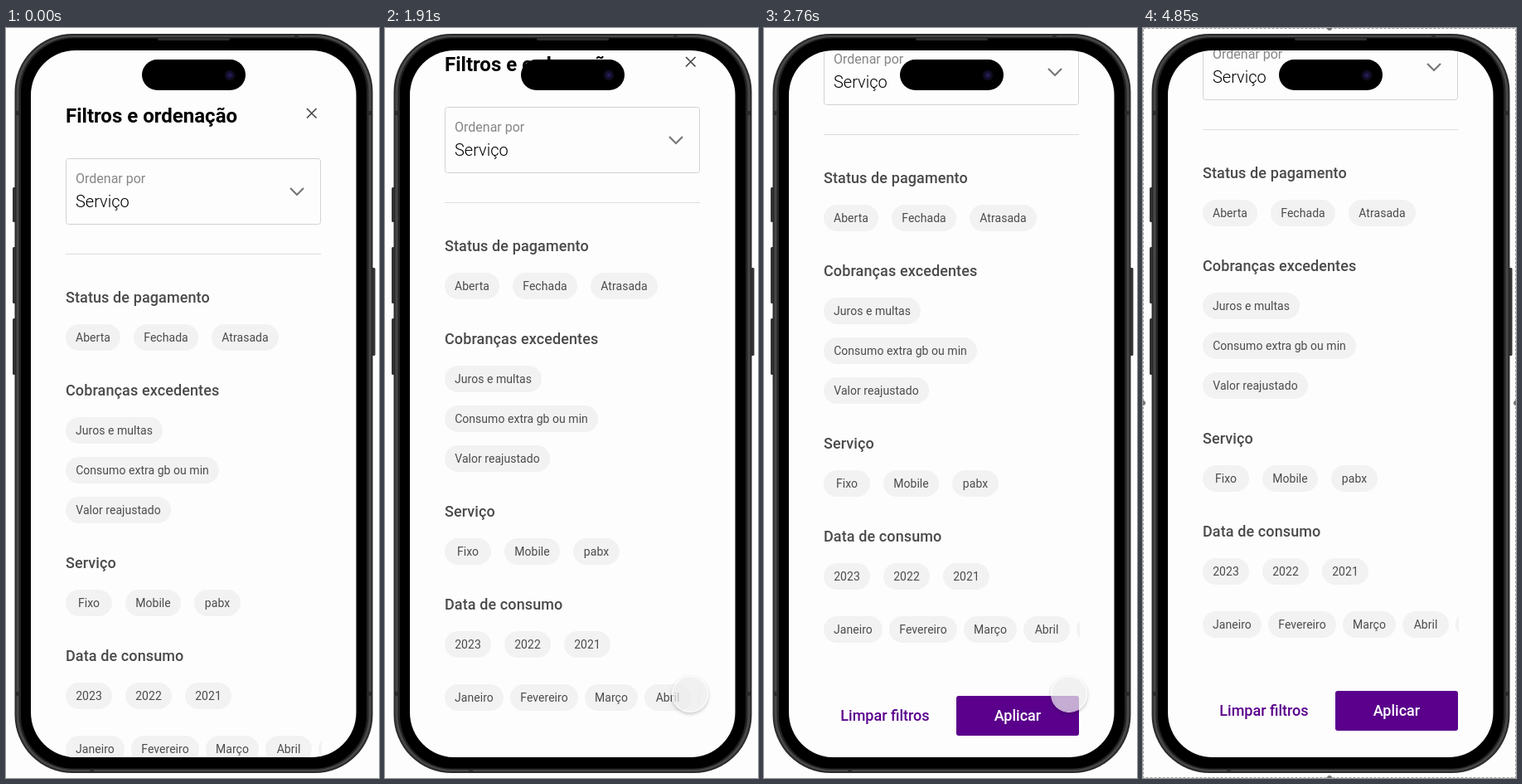
Write an HTML page that moves like this. It is 450x904 px and loops after 4880 ms.

```html
<!DOCTYPE html>
<html lang="pt-BR">
<head>
<meta charset="utf-8">
<title>Filtros e ordenação</title>
<style>
html, body { margin: 0; width: 100%; height: 100%; overflow: hidden; background: #fdfdfd; }
svg { position: absolute; left: 0; top: 0; font-family: Roboto, sans-serif; }
.title { font-size: 24px; font-weight: 700; }
.label { font-size: 16px; fill: #868686; }
.value { font-size: 20px; font-weight: 300; }
.head { font-size: 18px; font-weight: 500; fill: #4a4a4a; letter-spacing: .1px; }
.chip { font-size: 14px; fill: #4c4c4c; letter-spacing: .04px; text-anchor: middle; }
.button { font-size: 18px; font-weight: 500; text-anchor: middle; }
#cursor {
  position: absolute; left: -22px; top: -22px; width: 44px; height: 44px;
  box-sizing: border-box; border-radius: 50%; border: 1px solid rgba(255,255,255,.8);
  background: rgba(236,236,236,.73); background-clip: padding-box;
  box-shadow: 0 2px 4px rgba(0,0,0,.22);
}
</style>
</head>
<body>
<svg width="450" height="904" viewBox="0 0 450 904">
  <defs>
    <clipPath id="screen"><rect x="30" y="27" width="392.5" height="852" rx="54"/></clipPath>
    <radialGradient id="lens">
      <stop offset="0" stop-color="#2c2468"/>
      <stop offset=".5" stop-color="#15102f"/>
      <stop offset="1" stop-color="#0a0814"/>
    </radialGradient>
  </defs>

  <!-- side buttons -->
  <g fill="#333">
    <rect x="8" y="192" width="5" height="42" rx="1.5"/>
    <rect x="8" y="264" width="5" height="68" rx="1.5"/>
    <rect x="8" y="350" width="5" height="68" rx="1.5"/>
    <rect x="440" y="289" width="5.5" height="106" rx="1.5"/>
  </g>

  <!-- frame -->
  <rect x="10.5" y="7" width="432" height="891" rx="70" fill="#2a2a2a"/>
  <rect x="12.5" y="9" width="428" height="887" rx="68" fill="#484848"/>
  <rect x="15.5" y="11" width="422" height="883" rx="66" fill="#222"/>
  <g fill="#2a2a2a">
    <rect x="11" y="100" width="6" height="5"/>
    <rect x="436" y="100" width="6" height="5"/>
    <rect x="11" y="800" width="6" height="5"/>
    <rect x="436" y="800" width="6" height="5"/>
    <rect x="348" y="7" width="5" height="5"/>
    <rect x="101" y="893" width="5" height="5"/>
  </g>
  <rect x="18" y="12.5" width="417" height="880" rx="64"/>
  <rect x="183" y="12" width="87" height="3" rx="1.5" fill="#2d2d2d"/>
  <rect x="30" y="27" width="392.5" height="852" rx="54" fill="#fdfdfd"/>

  <g clip-path="url(#screen)">
    <g id="page">
      <text class="title" x="72" y="114">Filtros e ordenação</text>
      <path d="M363 97l11.5 11.5m0-11.5L363 108.500" fill="none" stroke="#444" stroke-width="1.6"/>
      <rect x="72.500" y="157.500" width="307" height="79" rx="3" fill="none" stroke="#d2d2d2"/>
      <text class="label" x="84" y="187">Ordenar por</text>
      <text class="value" x="84" y="216">Serviço</text>
      <path d="M343 193l8 8 8-8" fill="none" stroke="#777" stroke-width="2.2"/>
      <path d="M72 272.500h308" stroke="#dcdcdc"/>
      <path d="M381 858.400A16 16 0 0 0 381 879.600z" fill="#f2f2f2"/>
      <rect x="232" y="949" width="148" height="48" rx="3" fill="#5a008c"/>
      <text class="button" x="146" y="979" fill="#5a008c">Limpar filtros</text>
      <text class="button" x="306" y="979" fill="#fff">Aplicar</text>
    </g>
  </g>

  <rect x="164" y="38" width="125" height="37" rx="18.500"/>
  <circle cx="270" cy="57" r="6.500" fill="url(#lens)"/>

  <g id="selection">
    <rect x=".5" y=".5" width="449" height="903" fill="none" stroke="#a0a0a0" stroke-dasharray="3 2"/>
    <g fill="#777">
      <circle cx="225" cy="0" r="3"/>
      <circle cx="0" cy="452" r="3"/>
      <circle cx="450" cy="452" r="3"/>
      <circle cx="225" cy="904" r="3"/>
    </g>
  </g>
</svg>
<div id="cursor"></div>

<script>
const LOOP = 4880;
const [page, selection, cursor] = ['page', 'selection', 'cursor'].map(id => document.getElementById(id));

function add(tag, attrs, text = '') {
  const el = document.createElementNS('http://www.w3.org/2000/svg', tag);
  for (const key in attrs) el.setAttribute(key, attrs[key]);
  el.textContent = text;
  page.append(el);
}

function heading(text, y) {
  add('text', { class: 'head', x: 72, y }, text);
}

// Each chip is [text, width].
function chips(y, gap, ...items) {
  let x = 72;
  for (const [text, width] of items) {
    add('rect', { x, y, width, height: 32, rx: 16, fill: '#f2f2f2' });
    add('text', { class: 'chip', x: x + width / 2, y: y + 21 }, text);
    x += width + gap;
  }
}

heading('Status de pagamento', 331);
chips(357, 16, ['Aberta', 66], ['Fechada', 78], ['Atrasada', 81]);
heading('Cobranças excedentes', 443);
chips(469, 16, ['Juros e multas', 117]);
chips(517, 16, ['Consumo extra gb ou min', 185]);
chips(565, 16, ['Valor reajustado', 127]);
heading('Serviço', 651);
chips(677, 16, ['Fixo', 56], ['Mobile', 67], ['pabx', 56]);
heading('Data de consumo', 763);
chips(789, 16, ['2023', 56], ['2022', 56], ['2021', 56]);
chips(853, 8, ['Janeiro', 71], ['Fevereiro', 82], ['Março', 64], ['Abril', 56]);

// Two flicks of the page: [time, offset].
const scroll = [[1690, 0], [1730, 3], [1800, 30], [1910, 62], [2090, 87],
  [2420, 108], [2560, 110], [2610, 114], [2680, 131], [2760, 144], [2940, 150]];

function offsetAt(t) {
  const i = scroll.findIndex(([time]) => time > t);
  if (i < 0) return 150;
  if (i === 0) return 0;
  const [t0, y0] = scroll[i - 1], [t1, y1] = scroll[i];
  return y0 + (y1 - y0) * (t - t0) / (t1 - t0);
}

const progress = (t, start, end) => Math.min(1, Math.max(0, (t - start) / (end - start)));

function draw(now) {
  const t = now % LOOP;
  page.setAttribute('transform', `translate(0 ${-Math.round(offsetAt(t))})`);

  const away = (1 - progress(t, 850, 1360)) ** 2 + progress(t, 3360, 3660) ** 2;
  cursor.style.transform = `translate(${368 + 50 * away}px, ${803 + 130 * away}px)`;
  cursor.style.visibility = t > 850 && t < 3660 ? 'visible' : 'hidden';

  selection.style.display = t >= 3760 ? '' : 'none';
}

const start = performance.now();
function tick() {
  draw(performance.now() - start);
  requestAnimationFrame(tick);
}
tick();
</script>
</body>
</html>
```
